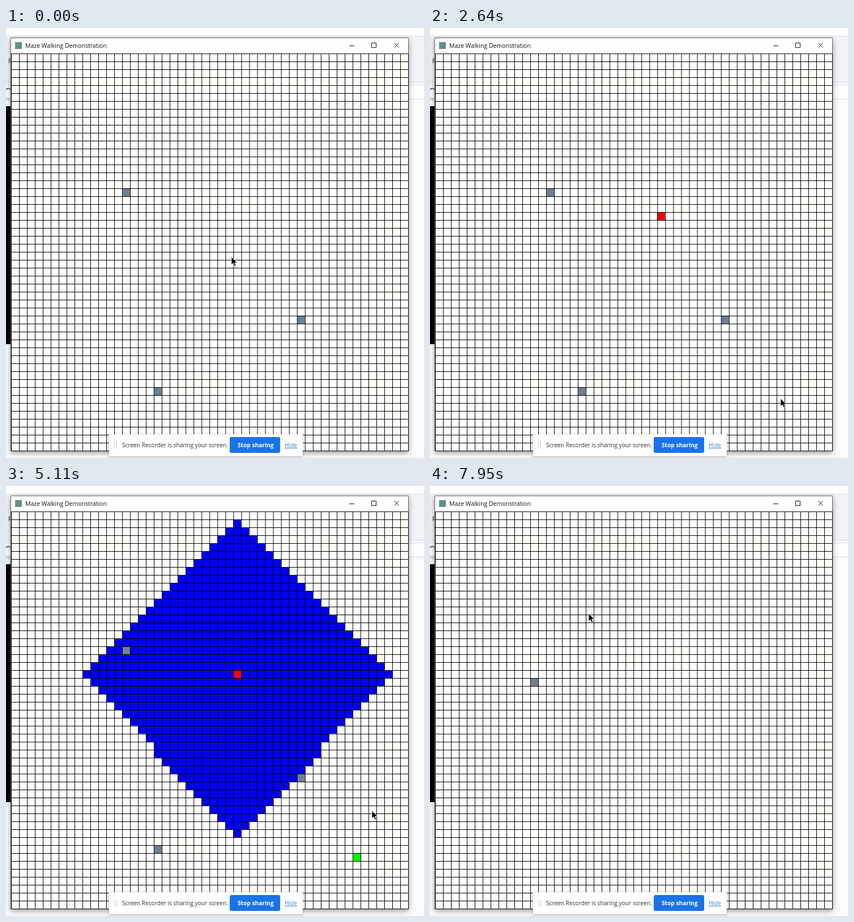
An HTML page with a canvas that plays this animation: 738x759 px, repeating every 7.99 s.

```html
<!DOCTYPE html>
<html lang="en">
<head>
<meta charset="utf-8">
<title>Maze Walking Demonstration</title>
<style>
  html, body { margin: 0; width: 100%; height: 100%; overflow: hidden; background: #fdfdfe; }
  #stage { position: relative; width: 738px; height: 759px; overflow: hidden; background: #fbfbfd; }
  svg, canvas { position: absolute; left: 0; top: 0; }
  text { font-family: "Open Sans", "Noto Sans", sans-serif; }
  .window { filter: drop-shadow(0 3px 5px #0006); }
  .bar { filter: drop-shadow(0 1px 2px #0005); }
</style>
</head>
<body>
<div id="stage">
  <svg width="738" height="759">
    <rect width="738" height="14" fill="#fefefe"/>
    <rect y="14" width="738" height="83" fill="#f3f3f7"/>
    <path d="M0 14.5H738M0 95.5H738M0 100.5H738" stroke="#dcdcf0"/>
    <rect y="101" width="738" height="24" fill="#fefefe"/>
    <path d="M0 125.5H738" stroke="#d9d9e2"/>
    <text x="4" y="62" font-size="10" fill="#222">F</text>
    <path d="M0 109Q4 104 8 109" fill="none" stroke="#333" stroke-width="1.5"/>
    <text x="-1" y="129" font-size="10" fill="#999">nc</text>
    <rect class="window" x="8" y="17" width="703" height="730" fill="#666"/>
    <rect y="138" width="8" height="420" fill="#050008"/>
    <rect x="9" y="18" width="701" height="27" fill="#fff"/>
    <rect x="16" y="25" width="12" height="12" fill="#63908c"/>
    <text x="34" y="35" font-size="10.5" fill="#111">Maze Walking Demonstration</text>
    <path d="M606 31.5h9M645.5 26.5h8v8h-8zM685.5 26.5l8 8m0-8l-8 8" fill="none" stroke="#111"/>
  </svg>
  <canvas id="board" width="738" height="759"></canvas>
  <svg width="738" height="759">
    <g class="bar"><rect x="182" y="717" width="342" height="39" fill="#fdfdfd"/></g>
    <path d="M191.5 731v11M195.5 731v11" stroke="#b4b4b4" stroke-dasharray="2 1"/>
    <g font-size="10.2">
      <text x="205" y="740" fill="#333">Screen Recorder is sharing your screen.</text>
      <rect x="395" y="722" width="89" height="28" rx="3" fill="#1a73e8"/>
      <text x="409" y="740" font-weight="700" fill="#fff">Stop sharing</text>
      <text x="492" y="740" fill="#4285c8" text-decoration="underline">Hide</text>
    </g>
    <path id="cursor" d="M0 0V14L3.2 11 5.6 16 8 15 5.7 10.2H10Z" fill="#000" stroke="#fff" stroke-width=".8"/>
  </svg>
</div>
<script>
const LOOP = 7990, STEP = LOOP / 233, SIZE = 50;
const RED_AT = 750, GREEN_AT = 2800, SEARCH_AT = 4790, FOUND_AT = 5665, RESET_AT = 6300;
const CELLS_PER_MS = 2.444;
const start = [28, 20], goal = [43, 43];
const walls = [[14, 17], [36, 33], [18, 42]], nextWalls = [[12, 21]];

// time, x, y
const track = [
  [0, 398, 404], [150, 398, 404], [650, 408, 332], [800, 411, 331], [930, 415, 330],
  [1250, 415, 330], [1890, 528, 498], [2550, 619, 654], [2900, 619, 654],
  [3300, 646, 573], [6700, 646, 573], [7500, 280, 225], [LOOP, 280, 225]
];

const ctx = document.getElementById('board').getContext('2d');
const cursor = document.getElementById('cursor');

// Lines are 14px apart and drift by one soft pixel around the middle.
const drift = (i, from, to) => Math.min(1, Math.max(0, (i - from) / (to - from)));
const lineX = i => 9 + 14 * i + drift(i, 20, 42);
const lineY = i => 45 + 14 * i + drift(i, 22, 36);
const key = ([x, y]) => y * SIZE + x;

function searchOrder() {
  const seen = new Set([...walls, start].map(key)), queue = [start];
  for (let i = 0; i < queue.length; i++) {
    const [x, y] = queue[i];
    for (const cell of [[x, y + 1], [x + 1, y], [x - 1, y], [x, y - 1]]) {
      if (cell.some(v => v < 0 || v >= SIZE) || seen.has(key(cell))) continue;
      seen.add(key(cell));
      queue.push(cell);
    }
  }
  return queue;
}

function shortestPath() {
  const cells = [];
  for (let y = start[1]; y <= goal[1]; y++) cells.push([start[0], y]);
  for (let x = start[0]; x < goal[0]; x++) cells.push([x, goal[1]]);
  return cells;
}

const order = searchOrder(), path = shortestPath();

function fill(cells, color) {
  ctx.fillStyle = color;
  for (const [x, y] of cells) {
    const left = Math.round(lineX(x)), top = Math.round(lineY(y));
    ctx.fillRect(left, top, Math.round(lineX(x + 1)) - left, Math.round(lineY(y + 1)) - top);
  }
}

function drawBoard(t) {
  ctx.fillStyle = '#fffffc';
  ctx.fillRect(9, 45, 701, 701);
  const active = t < RESET_AT;
  if (t >= SEARCH_AT && t < FOUND_AT) {
    fill(order.slice(0, Math.round((t - SEARCH_AT) * CELLS_PER_MS)), '#0000f4');
  }
  if (t >= FOUND_AT && active) fill(path, '#ff0');
  fill(active ? walls : nextWalls, '#708090');
  if (t >= RED_AT && active) fill([start], '#f00');
  if (t >= GREEN_AT && active) fill([goal], '#0f0');
  ctx.fillStyle = '#000';
  for (let i = 0; i <= SIZE; i++) {
    ctx.fillRect(lineX(i), 45, 1, 702);
    ctx.fillRect(9, lineY(i), 702, 1);
  }
}

function moveCursor(t) {
  const i = track.findIndex(p => p[0] > t);
  const [t0, x0, y0] = track[i - 1], [t1, x1, y1] = track[i];
  const u = (t - t0) / (t1 - t0), e = u * u * (3 - 2 * u);
  const x = Math.round(x0 + (x1 - x0) * e), y = Math.round(y0 + (y1 - y0) * e);
  cursor.setAttribute('transform', `translate(${x} ${y})`);
}

function frame() {
  const t = Math.floor((performance.now() % LOOP + 5) / STEP) * STEP % LOOP;
  drawBoard(t);
  moveCursor(t);
  requestAnimationFrame(frame);
}
frame();
</script>
</body>
</html>
```
